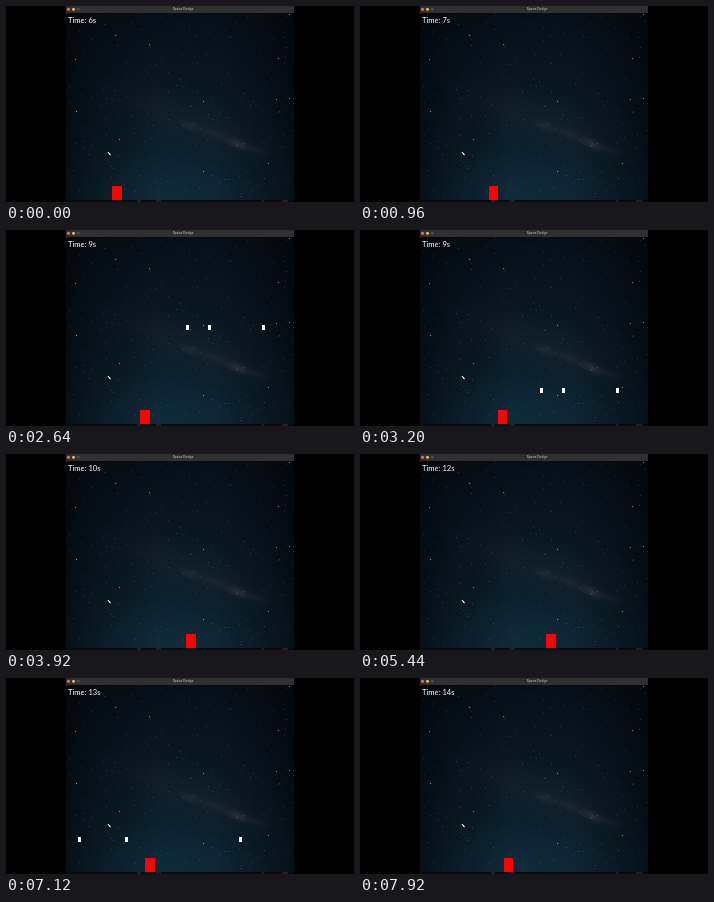
An HTML page with a canvas that plays this animation: 348 by 196 pixels, repeating every 8000 ms.

```html
<!DOCTYPE html>
<html lang="en">
<head>
<meta charset="utf-8">
<title>Space Dodge</title>
<style>
  html, body { margin: 0; width: 100%; height: 100%; overflow: hidden; background: #000; }
  canvas { display: block; }
</style>
</head>
<body>
<canvas id="stage" width="348" height="196"></canvas>
<script>
const LOOP = 8000, STEP = 80;
const WINDOW = { left: 60, top: 7, right: 288, bottom: 194 };
const FALL_SPEED = 0.112;
const PLAYER_WIDTH = 9.4;

// Each wave: the time its rocks are centred on the top edge, and their left edges
const waves = [
  { start: 1833, xs: [180, 202, 256] },
  { start: 5745, xs: [72, 119, 233] },
];

// Player's left edge: [time, x], linear in between
const playerPath = [
  [0, 106.2], [642, 106.2], [1039, 134.2], [2900, 134.2], [2957, 138],
  [3322, 138], [4003, 186.3], [6231, 186.3], [6895, 139.2], [7430, 139.2],
  [7520, 132.3], [7760, 150], [7845, 144], [LOOP, 144],
];

const ctx = document.getElementById('stage').getContext('2d');
const backdrop = document.createElement('canvas');
backdrop.width = 348;
backdrop.height = 196;

function rect(c, x, y, w, h, color) {
  c.fillStyle = color;
  c.fillRect(x, y, w, h);
}

function dot(c, x, y, r, color) {
  c.fillStyle = color;
  c.beginPath();
  c.arc(x, y, r, 0, Math.PI * 2);
  c.fill();
}

function glow(c, x, y, rx, ry, angle, rgb, alpha) {
  c.save();
  c.translate(x, y);
  c.rotate(angle);
  c.scale(rx, ry);
  const g = c.createRadialGradient(0, 0, 0, 0, 0, 1);
  g.addColorStop(0, `rgba(${rgb},${alpha})`);
  g.addColorStop(0.5, `rgba(${rgb},${alpha * 0.45})`);
  g.addColorStop(1, `rgba(${rgb},0)`);
  dot(c, 0, 0, 1, g);
  c.restore();
}

function fillWindow(c, vertical, stops) {
  const { left, top, right, bottom } = WINDOW;
  const g = vertical
    ? c.createLinearGradient(0, top, 0, bottom)
    : c.createLinearGradient(left, 0, right, 0);
  stops.forEach(([at, color]) => g.addColorStop(at, color));
  rect(c, left, top, right - left, bottom - top, g);
}

function seededRandom(seed) {
  return () => (seed = (seed * 16807) % 2147483647) / 2147483647;
}

function paintSky(c) {
  const { left, top, right, bottom } = WINDOW;
  const random = seededRandom(4217);
  c.save();
  c.beginPath();
  c.rect(left, top, right - left, bottom - top);
  c.clip();

  fillWindow(c, true, [[0, '#050f17'], [0.5, '#0a1925'], [1, '#0d2533']]);
  glow(c, 160, 185, 95, 45, 0, '24,62,82', 0.25);

  // Milky Way: a broad faint band with a few brighter knots
  glow(c, 180, 114, 120, 32, 0.36, '42,46,58', 0.22);
  glow(c, 184, 120, 14, 6, 0.4, '66,64,74', 0.32);
  glow(c, 212, 129, 30, 7, 0.4, '66,64,74', 0.2);
  glow(c, 232, 138, 14, 7, 0.4, '90,84,92', 0.4);
  glow(c, 250, 144, 20, 6, 0.4, '66,64,74', 0.2);

  fillWindow(c, false, [
    [0, 'rgba(0,0,0,.55)'], [0.15, 'rgba(0,0,0,.28)'], [0.4, 'rgba(0,0,0,0)'],
    [0.65, 'rgba(0,0,0,0)'], [0.85, 'rgba(0,0,0,.28)'], [1, 'rgba(0,0,0,.55)'],
  ]);

  for (let i = 0; i < 600; i++) {
    const x = left + random() * (right - left);
    const y = top + random() * (bottom - top);
    rect(c, Math.floor(x), Math.floor(y), 1, 1, `rgba(150,175,195,${0.03 + 0.25 * random() ** 3})`);
  }
  for (let i = 0; i < 150; i++) {
    const along = random() * 190 - 95;
    const across = (random() + random() - 1) * 18;
    rect(c, 190 + along, 118 + along * 0.4 + across, 1, 1, `rgba(150,140,150,${0.14 * random()})`);
  }
  const brightStars = [
    [109, 29], [270, 93], [283, 8], [272, 52], [197, 165], [143, 38],
    [113, 133], [69, 53], [70, 105], [197, 95], [262, 157], [283, 92],
  ];
  for (const [x, y] of brightStars) rect(c, x, y, 1, 1, 'rgba(205,220,230,.6)');
  c.restore();
}

function paintCursor(c) {
  for (const [width, color] of [[2.4, '#060d13'], [1.2, '#fff']]) {
    c.lineWidth = width;
    c.strokeStyle = color;
    c.beginPath();
    c.moveTo(102, 146);
    c.lineTo(104.5, 149.2);
    c.stroke();
  }
}

function paintBackdrop(c) {
  rect(c, 0, 0, 348, 196, '#000');
  paintSky(c);
  rect(c, WINDOW.left, 0, WINDOW.right - WINDOW.left, WINDOW.top, '#303030');
  dot(c, 62.5, 3.2, 1.5, '#ed6a5e');
  dot(c, 67.5, 3.2, 1.5, '#e5bd5b');
  dot(c, 72.3, 3.2, 1.4, '#51504c');
  c.fillStyle = '#a0a0a0';
  c.font = 'bold 3.2px Inter, sans-serif';
  c.textAlign = 'center';
  c.fillText('Space Dodge', 177, 4.4);
  rect(c, WINDOW.left, 194, WINDOW.right - WINDOW.left, 2, '#080b0e');
  for (const [x, w] of [[131, 4], [150, 5], [256, 2], [276, 6]]) rect(c, x, 194.5, w, 1, '#343a3e');
  paintCursor(c);
}

function playerX(t) {
  const i = playerPath.findIndex(([time]) => time > t);
  const [t0, x0] = playerPath[i - 1], [t1, x1] = playerPath[i];
  return x0 + (x1 - x0) * (t - t0) / (t1 - t0);
}

function draw(t) {
  const { left, top, right, bottom } = WINDOW;
  ctx.drawImage(backdrop, 0, 0);

  ctx.fillStyle = '#fff';
  ctx.font = '7.6px Lato, sans-serif';
  ctx.fillText(`Time: ${Math.floor((t + 6620) / 1000)}s`, 62, 17);

  ctx.save();
  ctx.beginPath();
  ctx.rect(left, top, right - left, bottom - top);
  ctx.clip();
  const x = playerX(t), playerLeft = Math.round(x);
  rect(ctx, playerLeft, 180, Math.round(x + PLAYER_WIDTH) - playerLeft, 14, '#f00');
  for (const { start, xs } of waves) {
    const y = Math.round(top + (t - start) * FALL_SPEED - 2.4);
    if (t >= start) xs.forEach(x => rect(ctx, x, y, 3, 5, '#fff'));
  }
  ctx.restore();
}

paintBackdrop(backdrop.getContext('2d'));
const startTime = performance.now();
function frame() {
  const t = (performance.now() - startTime) % LOOP;
  draw(Math.floor(t / STEP) * STEP);
  requestAnimationFrame(frame);
}
frame();
</script>
</body>
</html>
```
